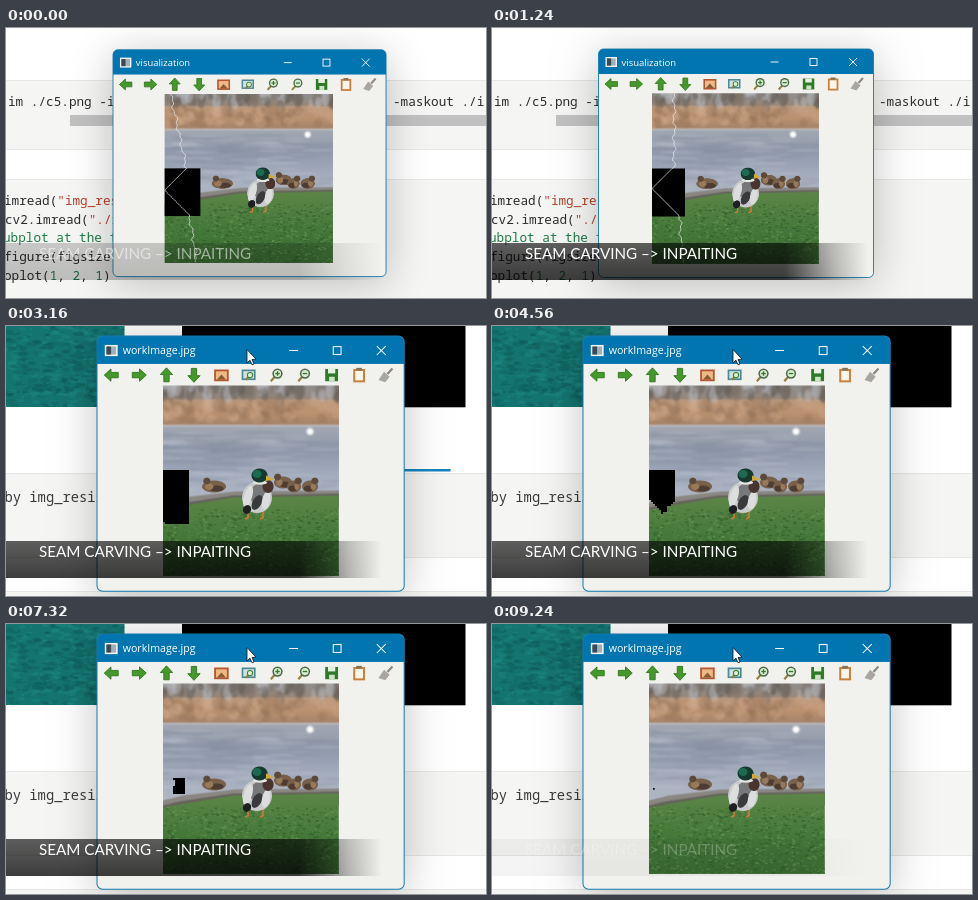
Write an HTML page with a canvas that moves like this. It is 480 by 270 pixels and loops after 9.76 s.

```html
<!DOCTYPE html>
<html lang="en">
<head>
<meta charset="utf-8">
<title>Seam carving and inpainting</title>
<style>
html, body { margin: 0; width: 100%; height: 100%; overflow: hidden; background: #fff; }
canvas { display: block; width: 480px; height: 270px; }
</style>
</head>
<body>
<canvas id="stage" width="480" height="270"></canvas>
<script>
const ctx = document.getElementById('stage').getContext('2d');
const LOOP = 9760, START = 520, CUT = 2760, END = 9240, ZOOM = 1.117;
const MONO = '"Noto Sans Mono", monospace', SANS = '"Open Sans", sans-serif';
const clamp = (v, a = 0, b = 1) => Math.min(b, Math.max(a, v));
const mix = (a, b, p) => a + (b - a) * p;
const wrap = (v, n) => (v % n + n) % n;
const hash = n => wrap(Math.sin(n * 127.1 + 11.7) * 43758.5453, 1);

function rect(c, color, x, y, w, h) { c.fillStyle = color; c.fillRect(x, y, w, h); }
function oval(c, color, x, y, rx, ry, turn = 0) {
  c.fillStyle = color;
  c.beginPath();
  c.ellipse(x, y, rx, ry, turn, 0, 7);
  c.fill();
}
function path(c, p) {
  c.beginPath();
  for (let i = 0; i < p.length; i += 2) c.lineTo(p[i], p[i + 1]);
}
function poly(c, color, ...p) {
  path(c, p);
  c.fillStyle = color;
  c.fill();
}
function line(c, color, width, ...p) {
  path(c, p);
  c.strokeStyle = color;
  c.lineWidth = width;
  c.stroke();
}
function text(str, x, y, size, color, family = MONO) {
  ctx.font = size + 'px ' + family;
  ctx.fillStyle = color;
  ctx.fillText(str, x, y);
}
function code(x, y, ...parts) {
  for (let i = 0; i < parts.length; i += 2) {
    text(parts[i], x, y, 12.7, parts[i + 1]);
    x += ctx.measureText(parts[i]).width;
  }
}
// Seeded flecks of several colours inside a box
function flecks(c, colors, count, alpha, x, y, w, h, fw, fh) {
  c.globalAlpha = alpha;
  for (let i = 0; i < count; i++) {
    const s = .5 + hash(i + .7);
    oval(c, colors[i % colors.length], x + hash(i * 2 + y) * w, y + hash(i * 3 + .4) * h, fw * s / 2, fh * s / 2);
  }
  c.globalAlpha = 1;
}

// The photo: 176 x 191 units plus a margin on the left
const MARGIN = 24, PW = 176, PH = 191, FULL = PW + MARGIN;
const photo = document.createElement('canvas');
photo.width = FULL * 2;
photo.height = PH * 2;

function fade(c, y0, y1, ...colors) {
  const g = c.createLinearGradient(0, y0, 0, y1);
  colors.forEach((color, i) => g.addColorStop(i / (colors.length - 1), color));
  return g;
}

function brownDuck(c, x, y, w, dir) {
  oval(c, '#78604b', x, y, w, 6);
  oval(c, '#4c3c31', x - dir * w * .2, y + 2, w * .6, 3);
  oval(c, '#98795a', x + dir * w * .4, y, w * .35, 3.5);
  oval(c, '#5d4939', x + dir * w * .6, y - 5.5, 3.6, 3.4);
}

function mallard(c) {
  for (const x of [85, 100]) line(c, '#d07a38', 1.6, x, 120, x, 132, x - 3, 133.5);
  oval(c, '#c9cacb', 94, 112, 15, 15.5);
  oval(c, '#77787a', 95, 108, 8, 10, .4);
  oval(c, '#3a3a3c', 94, 117, 4.5, 8, .5);
  oval(c, '#dcdddd', 85, 111, 4, 11, .3);
  oval(c, '#dcdddd', 103, 115, 4, 9, .2);
  oval(c, '#49352e', 105, 101, 5.5, 6.5);
  oval(c, '#1d1f22', 84, 124, 4, 4.5, .6);
  oval(c, '#e6e6e2', 97, 97, 7, 2.2);
  oval(c, '#15382f', 96.5, 90, 8, 7);
  oval(c, '#1c6a4f', 94, 88.5, 4.5, 4);
  poly(c, '#d3ab3b', 103, 90, 111.5, 94, 103, 95.5);
}

function paintPhoto() {
  const c = photo.getContext('2d'), L = -MARGIN;
  c.scale(2, 2);
  c.translate(MARGIN, 0);
  c.filter = 'blur(2px)';
  rect(c, fade(c, 0, 14, '#8f8f8e', '#97887c'), L - 6, -6, 216, 22);
  rect(c, fade(c, 14, 40, '#b9967a', '#bb9370', '#a38169'), L - 6, 14, 216, 26);
  rect(c, fade(c, 40, 116, '#a3a8b2', '#8f99ab', '#a4adbe', '#b0b6c2'), L - 6, 40, 216, 80);
  flecks(c, ['#625b56', '#b9bcc2', '#7b6f66'], 75, .5, L, -2, FULL, 14, 7, 13);
  flecks(c, ['#cdaa8b', '#936f56'], 80, .35, L, 16, FULL, 20, 9, 9);
  flecks(c, ['#c5ccd8', '#7c889b'], 90, .25, L, 46, FULL, 58, 36, 2.5);
  oval(c, '#fff', 147, 46, 3.5, 3.5);
  c.filter = 'blur(.8px)';
  poly(c, '#8a8782', L, 123, 20, 112, 72, 106, PW, 105, PW, 122, L, 134);
  poly(c, '#66645d', L, 128, 16, 118, 70, 110, PW, 108, PW, 122, L, 134);
  poly(c, fade(c, 110, PH, '#5d8648', '#45793a', '#3a6a33'), L, 130, 16, 121, 70, 112, PW, 110, PW, PH, L, PH);
  c.filter = 'none';
  flecks(c, ['#2c5527', '#6c9a55', '#35662d', '#558745'], 1500, .5, L, 124, FULL, 67, 2.6, 1.4);
  c.filter = 'blur(.6px)';
  brownDuck(c, 51, 101, 12, -1);
  brownDuck(c, 120, 97, 9, -1);
  brownDuck(c, 131, 101, 7, 1);
  brownDuck(c, 147, 101, 8, 1);
  c.filter = 'blur(.4px)';
  mallard(c);
  c.filter = 'none';
}

function arrow(x, turn) {
  const shape = [-6.5, 0, -.5, -5.5, -.5, -2.4, 6, -2.4, 6, 2.4, -.5, 2.4, -.5, 5.5, -6.5, 0];
  ctx.save();
  ctx.translate(x, 35);
  ctx.rotate(turn);
  poly(ctx, '#45982b', ...shape);
  line(ctx, '#2f741c', .8, ...shape);
  ctx.restore();
}
function lens(x, y, r, color) {
  line(ctx, '#94803c', 2, x - r * .5, y + r * .6, x - r * 1.3, y + r * 1.5);
  oval(ctx, color, x, y, r, r);
  oval(ctx, '#dcebd4', x, y, r * .7, r * .7);
}
function frame(x, y, w, h, b, outer, inner) {
  rect(ctx, outer, x, y, w, h);
  rect(ctx, inner, x + b, y + b, w - 2 * b, h - 2 * b);
}
function toolbar() {
  const at = i => 13 + 24.6 * i, green = '#2f7a28';
  [0, 2, 1, 3].forEach((q, i) => arrow(at(i), [0, Math.PI / 2, Math.PI, -Math.PI / 2][q]));
  frame(at(4) - 6.5, 30, 13, 10.5, 1.6, '#b3552f', '#eeb985');
  poly(ctx, '#8a5a33', at(4) - 4, 39, at(4), 34.5, at(4) + 4, 39);
  frame(at(5) - 6.5, 30, 12.5, 9.5, 1.5, '#4e8795', '#cfe3df');
  lens(at(5) + 1, 35, 2.8, green);
  for (const i of [6, 7]) {
    lens(at(i) + 1, 33.6, 4.6, '#4b6b48');
    line(ctx, green, 1.2, at(i) - 1, 33.6, at(i) + 3, 33.6);
  }
  line(ctx, green, 1.2, at(6) + 1, 31.6, at(6) + 1, 35.6);
  rect(ctx, green, at(8) - 5.5, 29.5, 11.5, 11);
  rect(ctx, '#e6f1e0', at(8) - 3, 29.5, 6.5, 4);
  rect(ctx, '#cfe2c6', at(8) - 2, 36.5, 5, 4);
  frame(at(9) - 5, 29.5, 10.5, 12, 1.8, '#c97f3d', '#fbf6ea');
  rect(ctx, '#8a7257', at(9) - 2.3, 28.5, 5, 2.4);
  line(ctx, '#8c8782', 2, at(10) + 5.5, 29, at(10) + 1, 34);
  poly(ctx, '#a9a5a0', at(10) - 2, 32, at(10) + 3, 36.5, at(10) - 1, 41.5, at(10) - 7, 39.5);
}

// Leaves the context in window units; the caller restores it
function openWindow(x, y, s, title) {
  ctx.save();
  ctx.translate(x, y);
  ctx.scale(s, s);
  ctx.beginPath();
  ctx.roundRect(0, 0, 275, 228.5, 5);
  ctx.fillStyle = '#f1f2ee';
  ctx.shadowColor = 'rgba(0,0,0,.24)';
  ctx.shadowBlur = 44;
  ctx.shadowOffsetY = 6;
  ctx.fill();
  ctx.shadowColor = 'transparent';
  ctx.save();
  ctx.clip();
  rect(ctx, '#0075b0', 0, 0, 275, 25);
  ctx.restore();
  ctx.strokeStyle = '#1679ad';
  ctx.lineWidth = .9;
  ctx.stroke();
  frame(7, 8, 11.5, 10, 1.4, '#f4f4f4', '#9fb0ba');
  rect(ctx, '#3c4a55', 8.4, 9.4, 4.2, 7.2);
  text(title, 23, 16.5, 9.5, '#fff', SANS);
  line(ctx, '#fff', .9, 172, 13, 180, 13);
  ctx.strokeRect(211.5, 9.5, 7, 7);
  line(ctx, '#fff', .9, 250.5, 9, 258.5, 17);
  line(ctx, '#fff', .9, 258.5, 9, 250.5, 17);
  toolbar();
}

// The photo loses columns on its left side
function showPhoto(left, w) {
  ctx.save();
  ctx.beginPath();
  ctx.rect(left, 44.3, w, PH / ZOOM);
  ctx.clip();
  ctx.drawImage(photo, left + w - FULL / ZOOM, 44.3, FULL / ZOOM, PH / ZOOM);
  ctx.restore();
}

// A wavering line that crosses the hole along two diagonals
function drawSeam(left, bw, t) {
  const step = Math.floor(t / 80), p = (t - START) / 1680;
  const jump = k => (hash(step * 5 + k) - .5) * 8 * clamp(p * 9);
  const top = mix(6, 25, clamp(p * 2)), enter = clamp(22 + jump(1), 6, bw - 1);
  const exit = clamp(25 + jump(2), 6, bw - 1), turn = 97 + jump(3), low = mix(33, 27, p);
  const pts = [];
  for (let y = 0; y < 171; y += 1.5) {
    let x;
    if (y >= 75 && y < 123) x = y < turn ? Math.min(enter, turn - y) : Math.min(exit, y - turn);
    else {
      x = y < 75 ? mix(top, enter, y / 75) : mix(exit, low, (y - 123) / 48);
      x += Math.sin(y * .33 + step) * 1.2 + Math.sin(y * .85 + step * 2) * .8;
    }
    pts.push(left + Math.max(.5, x), 44.5 + y);
  }
  line(ctx, 'rgba(240,242,245,.85)', .8, ...pts);
}

function cell(y, h) {
  rect(ctx, '#e6e6e4', 0, y, 480, h);
  rect(ctx, '#f5f5f4', 0, y + 1, 480, h - 2);
}

function carving(t) {
  rect(ctx, '#fff', 0, 0, 480, 270);
  cell(52, 70);
  cell(151, 130);
  rect(ctx, '#c1c1c1', 64, 87, 416, 11);
  const ink = '#2c2c2c', red = '#b5402a', green = '#1d7a46';
  code(2, 78, 'im ./c5.png -i', ink);
  code(387, 78, '-maskout ./i', ink);
  code(-2, 177, 'imread(', ink, '"img_res', red);
  code(-1, 195.7, 'cv2.imread(', ink, '"./i', red);
  code(-3, 214.4, 'ubplot at the f', green);
  code(-2, 233.1, 'figure(figsize', ink);
  code(-2, 251.8, 'oplot(', ink, '1', green, ', ', ink, '2', green, ', ', ink, '1', green, ')', ink);
  if (t > START) rect(ctx, '#1583bd', wrap(24 + (t - 2200) * .5, 800) - 90, 48, 90, 2);

  const grow = clamp((t - START) / 240);
  openWindow(mix(107, 106.5, grow), mix(21.7, 21, grow), mix(.993, 1, grow), 'visualization');
  const p = (t - START) / 1680;
  const w = 170 - Math.round(14 * p * mix(.9, 1.28, p)) / 2 * (9 / 9), left = 137 - w / 2, bw = w - 134;
  showPhoto(left, w);
  rect(ctx, '#000', left, 119.5, bw, 48);
  drawSeam(left, bw, t);
  ctx.restore();
}

// Time at which a 2px cell of the hole is filled: the lower part row by row,
// the upper part as a box closing in on cell (9, 11)
function fillTime(i, j) {
  const noise = hash(Math.floor(i / 3) * 31 + Math.floor(j / 3) * 7) - .5;
  if (j > 12) {
    const edge = Math.min(i, 12 - i) / 6;
    return Math.min(6000, 3220 + 2500 * mix((26 - j) / 13, edge, .3) + noise * 500);
  }
  const far = Math.max(i < 9 ? (9 - i) / 7 : (i - 9) / 3, j < 11 ? (11 - j) / 11 : (j - 11) / 2);
  return 6130 + 3000 * (1 - far) + noise * far * (1 - far) * 1500;
}

function inpainting(t) {
  rect(ctx, '#fff', 0, 0, 480, 270);
  ctx.save();
  ctx.beginPath();
  ctx.rect(0, 0, 118.5, 81);
  ctx.clip();
  rect(ctx, '#14746f', 0, 0, 119, 81);
  flecks(ctx, ['#0a5553', '#1f8a84', '#10625f'], 420, .4, 0, 0, 118, 81, 7, 3);
  ctx.restore();
  rect(ctx, '#000', 176, 0, 283.5, 81.3);
  cell(147, 85);
  cell(265, 20);
  text('by img_resize', -1.5, 176, 13.8, '#3a3a3a');
  rect(ctx, '#1583bd', wrap(38 + (t - 8520) * .704, 1045) - 60, 143, 60, 2.5);

  openWindow(91, 10, ZOOM, 'workImage.jpg');
  showPhoto(59.1, PW / ZOOM);
  ctx.restore();

  ctx.save();
  ctx.translate(157, 59);
  for (let j = 0; j < 27; j++)
    for (let i = 0; i < 13; i++)
      if (t < fillTime(i, j)) rect(ctx, '#000', i * 2, 85 + j * 2, 2, 2);
  if (t > 5600 && t < 6600)
    for (let k = 0; k < 3; k++) rect(ctx, '#000', 4 + k * 5, 117.5 + k * 1.2, 8, 1);
  if (t > 7600) {
    for (let k = 0; k < 7; k++)
      if (t < 8600 + k * 80) rect(ctx, '#000', 5 + hash(k) * 18, 90 + hash(k + 9) * 20, 1.4, 1.4);
    rect(ctx, '#000', 4, 105, 1.7, 1.7);
  }
  ctx.restore();

  const tip = [241, 23.5, 241, 37, 244, 34.2, 246, 38.8, 248, 38, 246, 33.5, 250, 33.2, 241, 23.5];
  poly(ctx, '#fff', ...tip);
  line(ctx, '#111', .8, ...tip);
}

function caption(t) {
  const a = Math.min(mix(.55, 1, clamp((t - START) / 400)), mix(1, .25, clamp((t - 8720) / 520)));
  const g = ctx.createLinearGradient(0, 0, 376, 0);
  g.addColorStop(.78, '#000');
  g.addColorStop(.91, 'rgba(0,0,0,.35)');
  g.addColorStop(1, 'rgba(0,0,0,0)');
  for (let y = 0; y < 37; y++) {
    ctx.globalAlpha = a * a * mix(.62, .76, y / 36);
    rect(ctx, g, 0, 215 + y, 376, 1);
  }
  ctx.globalAlpha = a;
  text('SEAM CARVING –> INPAITING', 33, 231, 15.2, '#fff', 'Lato, sans-serif');
  ctx.globalAlpha = 1;
}

function draw(now) {
  const t = clamp(Math.floor(now % LOOP / 40) * 40, START, END);
  if (t < CUT) carving(t); else inpainting(t);
  caption(t);
  requestAnimationFrame(draw);
}
paintPhoto();
requestAnimationFrame(draw);
</script>
</body>
</html>
```
